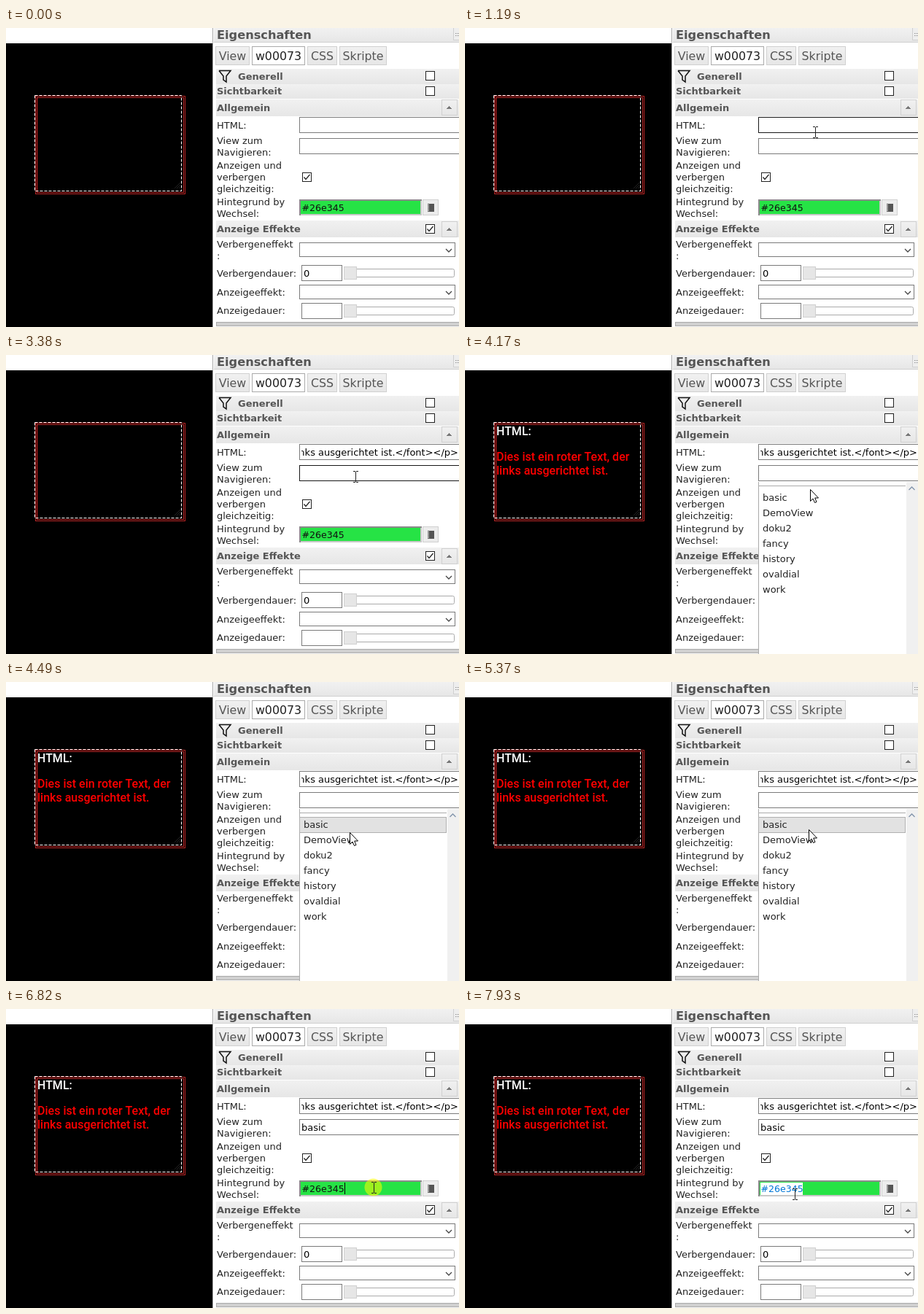
An HTML page with a canvas for the animation above (8 s loop, 621 px wide and 410 px high).

```html
<!DOCTYPE html>
<html lang="de">
<head>
<meta charset="utf-8">
<title>Eigenschaften</title>
<style>
html, body { margin: 0; width: 100%; height: 100%; overflow: hidden; background: #fff; }
canvas { display: block; }
</style>
</head>
<body>
<canvas id="stage" width="621" height="410"></canvas>
<script>
const g = document.getElementById('stage').getContext('2d');
const UI = '"DejaVu Sans", Verdana, sans-serif';
const LOOP = 8000, STEP = 120, BLINK = 530;

// times of the clicks and edits
const ENTER = 490, HTML_CLICK = 1630, PASTE = 2710, NAV_CLICK = 3580, PICK = 5470, COLOR_CLICK = 6700;
const DRAG = 6920, RELEASE = 7150;

// pointer moves: start, end, target x, target y
const moves = [[490, 1190, 480, 143], [1190, 1410, 479, 134], [3030, 3380, 479, 167],
  [3940, 4170, 473, 184], [4170, 4490, 471, 206], [5130, 5370, 471, 202],
  [5920, 6470, 504, 245], [6820, 7150, 379, 266], [7570, 7930, 452, 254]];

const fields = {
  html: [402, 122, 225, 22], nav: [402, 151, 225, 22], color: [402, 235, 168, 22],
  hideFx: [402, 294, 214, 20], showFx: [402, 352, 214, 20]
};
const labels = { 138: 'HTML:', 159: 'View zum|Navigieren:', 193: 'Anzeigen und|verbergen|gleichzeitig:',
  243: 'Hintegrund by|Wechsel:', 301: 'Verbergeneffekt|:', 341: 'Verbergendauer:',
  367: 'Anzeigeeffekt:', 392: 'Anzeigedauer:' };
const views = ['basic', 'DemoView', 'doku2', 'fancy', 'history', 'ovaldial', 'work'];

const within = (t, a, b) => t >= a && t < b;
const blink = age => age % (2 * BLINK) < BLINK;
const inside = (p, [x, y, w, h]) => p.x >= x && p.x < x + w && p.y >= y && p.y < y + h;

function pointer(t) {
  let x = 500, y = 402;
  for (const [from, to, tx, ty] of moves) {
    if (t < from) break;
    const n = Math.ceil((to - from) / STEP);
    const u = Math.min(1, Math.floor((t - from) / (to - from) * n) / n);
    x += (tx - x) * u;
    y += (ty - y) * u;
  }
  return { x: Math.round(x), y: Math.round(y) };
}

function rect(x, y, w, h, fill) {
  g.fillStyle = fill;
  g.fillRect(x, y, w, h);
}

function box(x, y, w, h, fill, edge) {
  if (fill) rect(x, y, w, h, fill);
  g.strokeStyle = edge;
  g.lineWidth = 1;
  g.strokeRect(x + .5, y + .5, w - 1, h - 1);
}

function text(s, x, y, color = '#222', font = '13px ' + UI, align = 'left') {
  g.font = font;
  g.fillStyle = color;
  g.textAlign = align;
  g.fillText(s, x, y);
}

function line(points, color, width = 1) {
  g.beginPath();
  points.forEach(([x, y]) => g.lineTo(x, y));
  g.strokeStyle = color;
  g.lineWidth = width;
  g.stroke();
}

function chevron(x, y, dy, color) {
  line([[x - 4, y], [x, y + dy], [x + 4, y]], color, 1.3);
}

function shade(y, h) {
  const s = g.createLinearGradient(0, y, 0, y + h);
  s.addColorStop(0, '#f1f1f1');
  s.addColorStop(1, '#e6e6e6');
  return s;
}

function clipped(x, y, w, h, draw) {
  g.save();
  g.beginPath();
  g.rect(x, y, w, h);
  g.clip();
  draw();
  g.restore();
}

function check(x, y, on) {
  box(x, y, 13, 13, '#fff', '#222');
  if (on) line([[x + 2.5, y + 6.5], [x + 5, y + 9.5], [x + 10.5, y + 3]], '#222', 1.3);
}

function section(label, x, y, h) {
  rect(288, y, 333, h, shade(y, h));
  text(label, x, Math.round(y + h / 2 + 4), '#555', 'bold 13px ' + UI);
}

function foldButton(y) {
  box(597, y, 22, 22, shade(y, 22), '#d0d0d0');
  for (let i = 0; i < 4; i++) rect(607 - i, y + 9 + i, 1 + 2 * i, 1, '#777');
}

function slider(y, value) {
  box(405, y, 56, 22, '#fff', '#7a7a7a');
  text(value, 408, y + 16, '#000');
  g.beginPath();
  g.roundRect(463.5, y + 5.5, 151, 11, 2);
  g.strokeStyle = '#aaa';
  g.stroke();
  box(463, y + 2, 18, 18, '#e6e6e6', '#d0d0d0');
}

function canvasArea(t) {
  rect(0, 0, 283, 21, '#fff');
  rect(0, 21, 283, 389, '#000');
  for (const d of [0, 2]) box(40 + d, 93 + d, 206 - 2 * d, 135 - 2 * d, null, '#b82424');
  rect(42, 95, 1, 131, '#f02828');
  for (let i = 0; i < 3; i++) line([[231 + i * 3, 220], [239, 212 + i * 3]], '#222');
  box(39, 92, 202, 132, null, '#000');
  g.setLineDash([4, 2]);
  box(39, 92, 202, 132, null, '#fff');
  g.setLineDash([]);
  if (t >= NAV_CLICK) {
    const font = '500 16px Roboto, sans-serif';
    text('HTML:', 43, 110, '#fff', font);
    text('Dies ist ein roter Text, der', 43, 145, '#f00', font);
    text('links ausgerichtet ist.', 43, 164, '#f00', font);
  }
}

function panelHead() {
  rect(283, 0, 338, 410, '#fff');
  rect(283, 0, 1, 410, '#aaa');
  rect(285, 0, 336, 20, shade(0, 20));
  rect(285, 19, 336, 1, '#d0d0d0');
  text('Eigenschaften', 289, 15, '#555', 'bold 16.2px ' + UI);
  box(613, -1, 12, 18, '#eee', '#d0d0d0');
  for (const x of [616, 618, 620]) for (const y of [7, 10]) rect(x, y, 1, 1, '#888');
  let x = 287;
  for (const name of ['View', 'w00073', 'CSS', 'Skripte']) {
    const on = name === 'w00073';
    g.font = '15.8px ' + UI;
    const w = Math.round(g.measureText(name).width + 9.5);
    box(x, 25, w, 26, on ? '#fff' : shade(25, 26), on ? '#aaa' : '#d0d0d0');
    text(name, x + w / 2, 44, on ? '#212121' : '#555', g.font, 'center');
    x += w + 3;
  }
}

function form(p) {
  section('Generell', 318, 56, 21);
  section('Sichtbarkeit', 289, 77, 20);
  section('Allgemein', 289, 98, 23);
  section('Anzeige Effekte', 289, 264, 23);
  line([[292, 58.5], [308, 58.5], [302, 66], [302, 74], [298, 71], [298, 66], [292, 58.5]], '#111', 1.5);
  check(575, 59);
  check(575, 80);
  check(575, 269, true);
  check(406, 198, true);
  foldButton(98);
  foldButton(265);

  for (const y in labels) labels[y].split('|').forEach((s, i) => text(s, 289, +y + 16 * i));

  for (const name of ['html', 'nav', 'hideFx', 'showFx']) {
    const hot = p && inside(p, fields[name]);
    box(...fields[name], '#fff', hot ? '#171717' : '#7a7a7a');
  }
  for (const y of [303, 361]) chevron(607, y, 4, '#444');
  slider(325, '0');
  slider(377, '');
  box(288, 403, 340, 6, '#d0d0d0', '#aaa');
}

function caret(x, y) { rect(x, y, 1, 16, '#000'); }

function values(t) {
  const pasted = t >= PASTE + 100, picked = t >= PICK;
  if (pasted) clipped(405, 124, 216, 19, () =>
    text('links ausgerichtet ist.</font></p>', 620, 138, '#000', '13px ' + UI, 'right'));
  else if (t >= HTML_CLICK && blink(t - HTML_CLICK)) caret(405, 125);
  if (picked) text('basic', 405, 167, '#000');
  if (within(t, NAV_CLICK, COLOR_CLICK) && blink(t - NAV_CLICK)) caret(picked ? 439 : 405, 154);
}

function colorField(t, p) {
  const code = color => text('#26e345', 405.5, 251, color, '12.6px ' + UI);
  rect(402, 235, 168, 22, '#c8c8c8');
  rect(402, 235, 168, 2, '#8a8a8a');
  rect(402, 235, 2, 22, '#8a8a8a');
  rect(404, 237, 164, 18, '#26e345');
  code('#111');
  if (within(t, COLOR_CLICK, DRAG)) caret(464, 238);
  if (t >= DRAG) {
    const from = t >= RELEASE ? 405 : Math.min(463, Math.max(405, p.x));
    clipped(from, 238, 463 - from, 17, () => {
      rect(405, 238, 58, 17, '#fff');
      code('#0078d7');
    });
  }
  box(571, 235, 22, 22, '#ececec', '#d0d0d0');
  rect(578, 241, 9, 11, '#555');
  for (let y = 242; y < 252; y += 2) rect(578, y, 2, 1, '#ddd');
}

function dropdown(p) {
  rect(402, 174, 219, 236, '#fff');
  rect(402, 174, 1, 236, '#aaa');
  rect(403, 179, 201, 1, '#aaa');
  rect(605, 174, 16, 236, '#f0f0f0');
  chevron(612.5, 185, -4, '#8093aa');
  views.forEach((name, i) => {
    const y = 185 + 21 * i;
    if (i === 0 && within(p.y, y, y + 22)) box(402, y, 202, 22, '#e2e2e2', '#b0b0b0');
    text(name, 408, y + 15);
  });
}

function drawPointer(t, p, open) {
  if (within(t, HTML_CLICK, 1830) || within(t, NAV_CLICK, 3700) || within(t, COLOR_CLICK, 7030)) {
    g.beginPath();
    g.arc(p.x - .5, p.y - .5, 12, 0, 7);
    g.fillStyle = 'rgba(255,255,0,.55)';
    g.fill();
  }
  const beam = within(t, DRAG, 7680) ||
    ['html', 'nav', 'color'].some(n => !(open && n === 'color') && inside(p, fields[n]));
  g.save();
  g.translate(p.x, p.y);
  if (beam) {
    rect(0, -7, 1, 14, '#222');
    for (const y of [-8, 7]) for (const x of [-3, 1]) rect(x, y, 3, 1, '#222');
  } else {
    g.beginPath();
    [[.5, .5], [.5, 16.5], [4, 13], [6.5, 18.5], [9, 17.5], [6.7, 12], [11.5, 12]]
      .forEach(([x, y]) => g.lineTo(x, y));
    g.closePath();
    g.fillStyle = '#fff';
    g.fill();
    g.strokeStyle = '#000';
    g.lineWidth = 1;
    g.stroke();
  }
  g.restore();
}

function draw(now) {
  const t = now % LOOP;
  const p = t >= ENTER ? pointer(t) : null;
  const open = within(t, NAV_CLICK, PICK);
  canvasArea(t);
  panelHead();
  form(p);
  values(t);
  colorField(t, p);
  if (open) dropdown(p);
  if (p && !within(t, PASTE, 3030)) drawPointer(t, p, open);
  requestAnimationFrame(draw);
}
requestAnimationFrame(draw);
</script>
</body>
</html>
```
